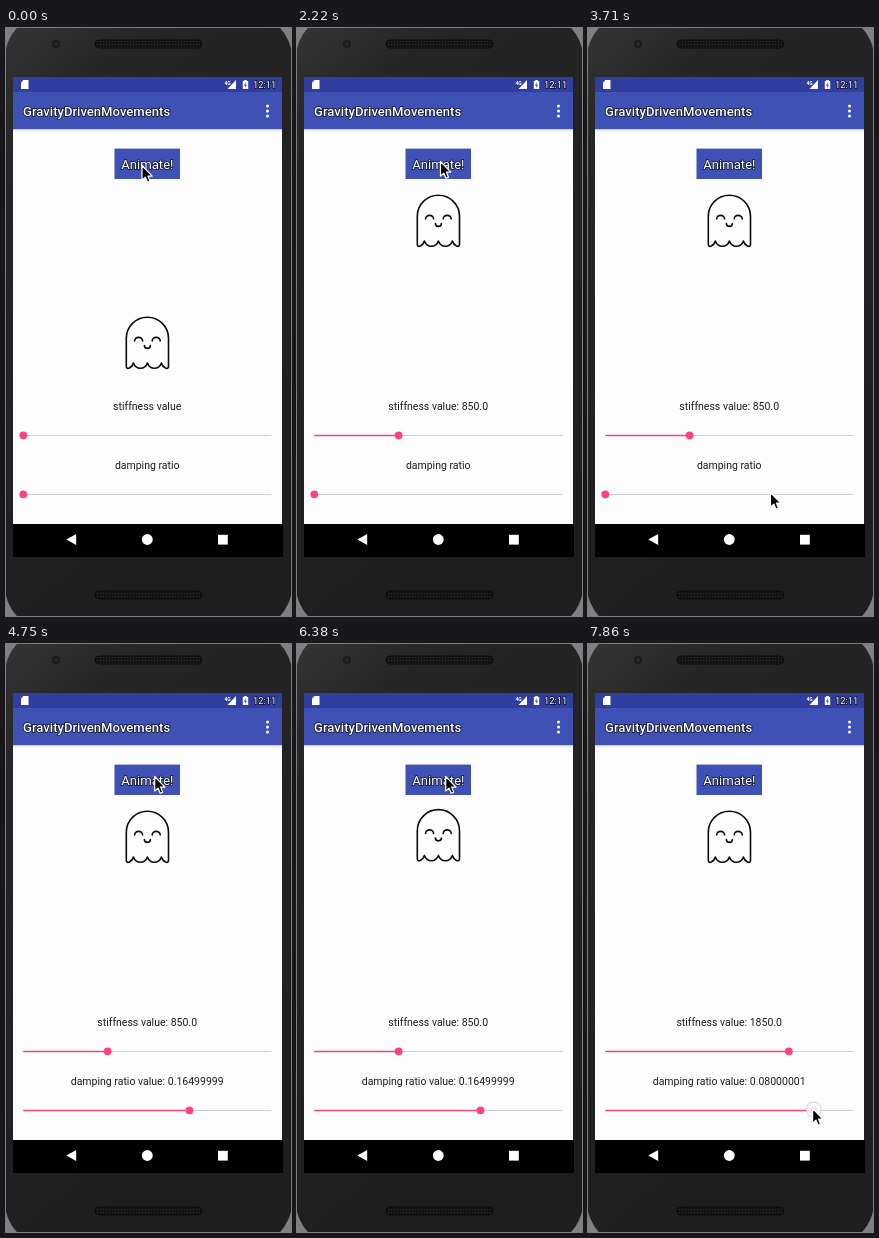
An HTML page for the animation above (8000 ms loop, 285 px wide and 588 px high).

```html
<!DOCTYPE html>
<html lang="en">
<head>
<meta charset="utf-8">
<title>Spring ghost</title>
<style>
  html, body { margin: 0; width: 100%; height: 100%; overflow: hidden; background: #222; }
  svg { display: block; width: 100%; height: 100%; }
  text { font-family: Roboto, "Open Sans", sans-serif; }
  .white { fill: #fff; }
  .mid { text-anchor: middle; }
  .label { font-size: 10.5px; fill: #1c1c1c; text-anchor: middle; }
  .edged { fill: #fff; font-size: 13.1px; stroke: #000; stroke-opacity: .75; stroke-width: 1.5px; paint-order: stroke; }
  .ink { fill: none; stroke: #0a0a0a; stroke-width: 1.6; stroke-linecap: round; stroke-linejoin: round; }
  .rail { stroke: #cfcfcf; stroke-width: 1; }
  .fill { stroke: #f7437f; stroke-width: 1.4; }
  .thumb { fill: #ff4081; }
</style>
</head>
<body>
<svg viewBox="0 0 285 588" preserveAspectRatio="none">
  <defs>
    <linearGradient id="body" x1="0" y1="0" x2=".4" y2="1">
      <stop offset="0" stop-color="#363636"/>
      <stop offset=".2" stop-color="#252525"/>
      <stop offset="1" stop-color="#1e1e1e"/>
    </linearGradient>
    <linearGradient id="shade" x1="0" y1="0" x2="0" y2="1">
      <stop offset="0" stop-color="#8c8fa8" stop-opacity=".6"/>
      <stop offset="1" stop-color="#fff" stop-opacity="0"/>
    </linearGradient>
    <pattern id="mesh" width="3" height="3" patternUnits="userSpaceOnUse">
      <rect width="3" height="3" fill="#111"/>
      <circle cx="1.5" cy="1.5" r=".8" fill="#2b2b2b"/>
    </pattern>
  </defs>

  <!-- phone -->
  <rect width="285" height="588" fill="#808080"/>
  <rect x="-1" y="-14" width="287" height="616" rx="44" fill="url(#body)"/>
  <rect x="89" y="12" width="107" height="8" rx="4" fill="url(#mesh)" stroke="#0c0c0c"/>
  <rect x="89" y="563" width="107" height="8" rx="4" fill="url(#mesh)" stroke="#0c0c0c"/>
  <circle cx="50" cy="16" r="4" fill="#1b1b1b"/>
  <circle cx="50" cy="16" r="1.8" fill="#2b2b2b"/>

  <!-- screen -->
  <rect x="7" y="49" width="269" height="480" fill="#fdfdfd"/>
  <rect x="7" y="64" width="269" height="37" fill="#3f51b5"/>
  <rect x="7" y="49" width="269" height="15" fill="#303f9f"/>
  <rect x="7" y="101" width="269" height="3" fill="url(#shade)"/>
  <path class="white" d="M17.5 52H22.5V61H15V54.5Z"/>
  <text class="white" x="218.5" y="56.5" font-size="5" font-weight="700">4G</text>
  <path class="white" d="M230 52V61H221.5Z"/>
  <path class="white" d="M238.2 52H240.8V53H242.2V61H236.8V53H238.2Z"/>
  <path d="M240 54.2L238 57.6H239.4L239 60L241 56.8H239.6Z" fill="#303f9f"/>
  <text class="edged" x="247" y="60.3" style="font-size: 9.3px">12:11</text>
  <text class="edged" x="17" y="87.7" font-weight="500">GravityDrivenMovements</text>
  <path d="M261.5 78V88.1" fill="none" stroke="#fff" stroke-width="3" stroke-linecap="round" stroke-dasharray="0 5"/>

  <g id="ghost" class="ink">
    <path d="M120.3 216V188.3A21.1 21.1 0 0 1 162.5 188.3V216Q162.5 219.3 159.5 218Q156.3 216.5 155.4 213Q153.5 218.3 148.4 218.3Q143.3 218.3 141.4 213Q139.5 218.3 134.4 218.3Q129.3 218.3 127.4 213Q126.5 216.5 123.3 218Q120.3 219.3 120.3 216Z"/>
    <path d="M128.6 191a4 3.6 0 0 1 8 0M146.2 191a4 3.6 0 0 1 8 0M138.4 195.6a3 2.8 0 0 0 6 0"/>
  </g>

  <rect x="108.5" y="120.6" width="65.5" height="30.4" fill="#3f51b5"/>
  <text class="edged mid" x="141.4" y="141.2">Animate!</text>

  <g id="sliders"></g>

  <rect x="7" y="496" width="270" height="33" fill="#000"/>
  <g class="white">
    <path d="M60.3 511.5L70.2 506V517Z"/>
    <circle cx="141.3" cy="511.5" r="5.4"/>
    <rect x="212" y="506.8" width="9.8" height="9.8"/>
  </g>

  <g id="pointer">
    <circle id="touch" cx="1" cy="1" r="7.5" fill="#fff" fill-opacity=".8" stroke="#cfc6ee"/>
    <path d="M0 0V14.6L3.3 11.6L5.5 16.8L8 15.7L5.9 10.6H10.3Z" fill="#000" stroke="#fff" stroke-width="1.2" stroke-linejoin="round"/>
  </g>
</svg>

<script>
const LOOP = 8000, TICK = 148.25, LEAD = 12; // the screen refreshes once per tick
const DROP = 122, HOLD = 15, TAP = 250;
const LEFT = 17.3, WIDTH = 248;
const $ = id => document.getElementById(id);

// button releases; each one lets the ghost spring back up
const releases = [0, 2524, 4898, 5776];

const stiffness = {
  y: 407.5, name: 'stiffness value', title: 'stiffness value', initial: 1500,
  taps: [{ at: 1150, p: .34 }, { at: 6900, p: .74 }],
  value: p => 2500 * p, digits: 1
};
const damping = {
  y: 466.5, name: 'damping ratio', title: 'damping ratio value', initial: .5,
  taps: [{ at: 3830, p: .67 }, { at: 7840, p: .84 }],
  value: p => (1 - Math.fround(p)) / 2, digits: 8
};
const sliders = [stiffness, damping];

const thumbX = p => LEFT + WIDTH * p;
const lastTap = (s, t) => s.taps.filter(tap => t >= tap.at).pop();
const setting = (s, t) => {
  const tap = lastTap(s, t);
  return tap ? s.value(tap.p) : s.initial;
};

// places where the pointer rests
const rest = (x, y, from, to) => ({ x, y, from, to });
const onSlider = (s, i, lift, from, to) => rest(thumbX(s.taps[i].p) - 1, s.y - lift, from, to);
const stops = [
  rest(136, 137.5, 0, 0),
  rest(83.5, 448, 445, 600),
  onSlider(stiffness, 0, 6, 1040, 1620),
  rest(143.5, 133.5, 2000, 3270),
  onSlider(damping, 0, 2, 3706, 4250),
  rest(148.7, 132.5, 4744, 6375),
  onSlider(stiffness, 1, 7, 6967, 7265),
  onSlider(damping, 1, 2, 7709, LOOP)
];

function add(tag, attrs) {
  const el = document.createElementNS('http://www.w3.org/2000/svg', tag);
  for (const key in attrs) el.setAttribute(key, attrs[key]);
  return $('sliders').appendChild(el);
}

for (const s of sliders) {
  add('line', { class: 'rail', x1: LEFT, x2: LEFT + WIDTH, y1: s.y, y2: s.y });
  s.fill = add('line', { class: 'fill', x1: LEFT, y1: s.y, y2: s.y });
  s.thumb = add('circle', { class: 'thumb', cy: s.y - .2, r: 3.9 });
  s.label = add('text', { class: 'label', x: 141.2, y: s.y - 26 });
}

const smooth = u => u * u * (3 - 2 * u);
const mix = (a, b, u) => a + (b - a) * u;

function pointerAt(t) {
  const i = stops.findLastIndex(s => t >= s.from);
  const a = stops[i], b = stops[i + 1];
  if (!b || t <= a.to) return [a.x, a.y];
  const u = smooth((t - a.to) / (b.from - a.to));
  return [mix(a.x, b.x, u), mix(a.y, b.y, u)];
}

function ghostOffset(t) {
  const at = releases.filter(r => t >= r - HOLD).pop();
  const dt = Math.max(0, t - at) / 1000;
  const w = Math.sqrt(setting(stiffness, at)), zeta = setting(damping, at);
  const root = Math.sqrt(1 - zeta * zeta), phase = w * root * dt;
  const y = DROP * Math.exp(-zeta * w * dt) * (Math.cos(phase) + zeta / root * Math.sin(phase));
  return Math.abs(y) < .4 ? 0 : y;
}

function isDown(t) {
  return releases.some(r => t >= r - HOLD && t < r)
    || sliders.some(s => s.taps.some(tap => t >= tap.at && t < tap.at + TAP));
}

function draw(t) {
  $('ghost').setAttribute('transform', `translate(0 ${ghostOffset(t).toFixed(2)})`);
  $('pointer').setAttribute('transform', `translate(${pointerAt(t).join(' ')})`);
  $('touch').setAttribute('visibility', isDown(t) ? 'visible' : 'hidden');
  for (const s of sliders) {
    const tap = lastTap(s, t), x = thumbX(tap ? tap.p : 0);
    s.fill.setAttribute('x2', x);
    s.thumb.setAttribute('cx', x);
    s.label.textContent = tap ? `${s.title}: ${s.value(tap.p).toFixed(s.digits)}` : s.name;
  }
}

const start = performance.now();
function frame() {
  const t = (performance.now() - start) % LOOP;
  draw(Math.floor((t + LEAD) / TICK) * TICK);
  requestAnimationFrame(frame);
}
frame();
</script>
</body>
</html>
```
